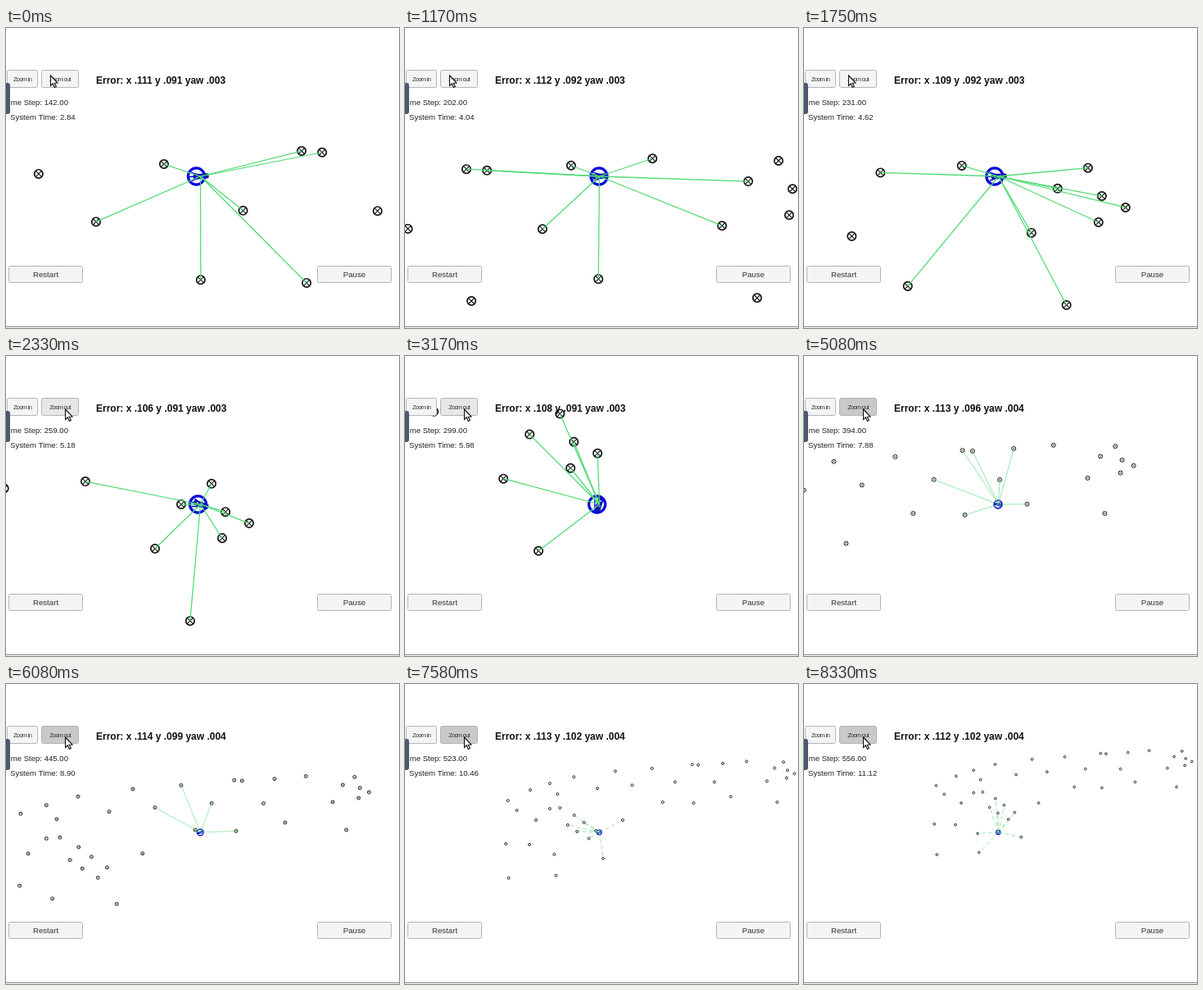
Write an HTML page with a canvas that moves like this. It is 480 px wide and 366 px high and loops after 8.51 s.

```html
<!DOCTYPE html>
<html lang="en">
<head>
<meta charset="utf-8">
<title>Particle filter simulation</title>
<style>
  html, body { margin: 0; width: 100%; height: 100%; overflow: hidden; background: #fff; }
  canvas { display: block; }
</style>
</head>
<body>
<canvas id="stage" width="480" height="366"></canvas>
<script>
const ctx = document.getElementById('stage').getContext('2d');
const LOOP = 8510, TICK = 1000 / 12;
const SKIPPED = [51, 77, 88, 92, 101];   // ticks on which the picture holds
const CENTER = { x: 237.5, y: 181 };
const RANGE = 53.97;                     // sensor range in world units
const ZOOM_START = 3190;
const FONT = '"Liberation Sans", Arial, sans-serif';

// Landmarks in world units
const landmarks = [
  [125, 142], [136, 154], [152.5, 129], [176.5, 121], [186, 134], [206, 113],
  [176.5, 152], [189, 151], [159.5, 166], [235, 127], [257, 106], [277.6, 123.2],
  [302, 102.5], [330.4, 119.2], [351.4, 97.8], [358.8, 98.3], [389, 96.5], [418.2, 94],
  [315.2, 144], [353.2, 145.1], [378.7, 119.3], [398.8, 137.2], [452.6, 102.2], [463.5, 94.8],
  [468.5, 104.9], [467.3, 114.3], [477, 109], [443.2, 118.1], [455.8, 144], [206.5, 160],
  [198.5, 172], [218.5, 169], [210, 180], [224.5, 188.5], [233, 179], [266, 166],
  [242, 213], [122.5, 195], [151.5, 196], [182, 208], [126, 237], [184, 234]
];

// Time, x, y along the drive
const route = [
  [0, 315.1, 106.9], [1167, 399.2, 100.4], [1920, 440, 97.8], [2333, 459.5, 102.2],
  [2833, 477, 112], [3250, 476, 131], [3667, 456, 145.4], [4083, 437.9, 149.4],
  [5167, 372.8, 136.8], [5650, 345.5, 141], [6083, 320, 146.3],
  [7583, 237.5, 181], [8333, 210.7, 206.4]
];

// Time, step, x error, y error (thousandths)
const readings = [
  [0, 142, 111, 91], [1167, 202, 112, 92], [2333, 259, 106, 91], [4083, 342, 111, 92],
  [6083, 445, 114, 99], [7583, 523, 113, 102], [8333, 556, 112, 102]
];

const clamp = v => Math.max(0, Math.min(1, v));

function segment(keys, t) {
  let i = 0;
  while (i < keys.length - 2 && t >= keys[i + 1][0]) i++;
  return i;
}

function reading(t, col) {
  const i = segment(readings, t), a = readings[i], b = readings[i + 1];
  return Math.round(a[col] + (b[col] - a[col]) * clamp((t - a[0]) / (b[0] - a[0])));
}

function slope(i, col) {
  const a = route[Math.max(0, i - 1)], b = route[Math.min(route.length - 1, i + 1)];
  return (b[col] - a[col]) / (b[0] - a[0]);
}

// Cubic Hermite through the route points
function along(t, col) {
  const i = segment(route, t), a = route[i], b = route[i + 1];
  const d = b[0] - a[0], u = clamp((t - a[0]) / d), v = 1 - u;
  return a[col] * (1 + 2 * u) * v * v + slope(i, col) * d * u * v * v
       + b[col] * u * u * (3 - 2 * u) - slope(i + 1, col) * d * u * u * v;
}

const carAt = t => ({ x: along(t, 1), y: along(t, 2) });

// The camera pulls back at constant speed while the button is held
const scaleAt = t => 1 / (0.294 + 0.162 * Math.max(0, t - ZOOM_START) / 1000);

function line(x1, y1, x2, y2) {
  ctx.beginPath();
  ctx.moveTo(x1, y1);
  ctx.lineTo(x2, y2);
  ctx.stroke();
}

function ring(x, y, r) {
  ctx.beginPath();
  ctx.arc(x, y, r, 0, Math.PI * 2);
}

function drawLandmark(x, y, s) {
  const r = Math.max(1.3, 1.52 * s), k = r * 0.62;
  ring(x, y, r);
  ctx.fillStyle = '#fff';
  ctx.fill();
  ctx.strokeStyle = '#111';
  ctx.lineWidth = Math.max(0.9, 0.5 * s);
  ctx.stroke();
  if (s > 1.15) {
    ctx.lineWidth = 0.32 * s;
    line(x - k, y - k, x + k, y + k);
    line(x - k, y + k, x + k, y - k);
  }
}

function drawBeam(x, y, s) {
  ctx.strokeStyle = '#4fdb74';
  ctx.lineWidth = Math.max(0.55, 0.37 * s);
  ctx.setLineDash(s < 1.15 ? [5, 3] : []);
  line(CENTER.x, CENTER.y, x, y);
  ctx.setLineDash([]);
}

function drawCar(t, n, s) {
  const a = carAt(t - 40), b = carAt(t + 40);
  const off = -0.74 * s * (1 + Math.cos(0.624 * n));
  const r = Math.max(2.3, 2.95 * s), x = CENTER.x + off * (s > 3 ? 1 : 0.2), y = CENTER.y;
  const heading = Math.atan2(b.y - a.y, b.x - a.x);

  ctx.save();
  ctx.translate(CENTER.x, CENTER.y);
  ctx.rotate(heading);
  ctx.fillStyle = '#12208c';
  ctx.beginPath();
  ctx.roundRect(-2.6 * s, -0.95 * s, 5.6 * s, 1.9 * s, 0.6 * s);
  ctx.fill();
  ctx.fillStyle = '#b9c3ee';
  ctx.fillRect(-1.5 * s, -0.55 * s, 0.6 * s, 1.1 * s);
  ctx.fillRect(0.3 * s, -0.55 * s, 0.6 * s, 1.1 * s);
  ctx.restore();

  ctx.strokeStyle = '#0505dc';
  ctx.lineWidth = Math.max(1.1, 0.95 * s);
  ring(x, y, r);
  ctx.stroke();
  ctx.lineWidth = 0.45 * s;
  const dx = Math.cos(heading) * r, dy = Math.sin(heading) * r;
  line(x - dx, y - dy, x + dx, y + dy);
  line(x - dx * 0.6 - dy * 0.5, y - dy * 0.6 + dx * 0.5, x + dx * 0.8, y + dy * 0.8);
  line(x - dx * 0.6 + dy * 0.5, y - dy * 0.6 - dx * 0.5, x + dx * 0.8, y + dy * 0.8);
}

function text(str, x, y, font, color = '#222', align = 'left', spacing = 0) {
  ctx.font = font + ' ' + FONT;
  ctx.fillStyle = color;
  ctx.textAlign = align;
  ctx.letterSpacing = spacing + 'px';
  ctx.fillText(str, x, y);
}

function button(label, x, y, w, h, size, fill = '#f4f4f4', spacing = 0) {
  ctx.beginPath();
  ctx.roundRect(x + 0.5, y + 0.5, w - 1, h - 1, 2);
  ctx.fillStyle = fill;
  ctx.fill();
  ctx.strokeStyle = '#b4b4b4';
  ctx.lineWidth = 1;
  ctx.stroke();
  text(label, x + w / 2, y + h / 2 + size * 0.36, size + 'px', '#333', 'center', spacing);
}

function drawCursor(x, y) {
  ctx.save();
  ctx.translate(x, y);
  ctx.beginPath();
  ctx.moveTo(0.5, 0);
  ctx.lineTo(0.5, 12.5);
  ctx.lineTo(3.3, 9.8);
  ctx.lineTo(5.3, 14.4);
  ctx.lineTo(7.3, 13.5);
  ctx.lineTo(5.3, 9.2);
  ctx.lineTo(9, 9);
  ctx.closePath();
  ctx.fillStyle = '#fff';
  ctx.strokeStyle = '#111';
  ctx.lineWidth = 1.1;
  ctx.fill();
  ctx.stroke();
  ctx.restore();
}

function drawPanel(t) {
  const step = reading(t, 1);
  const milli = v => '.' + String(v).padStart(3, '0');
  const move = clamp((t - 1950) / 280), ease = move * move * (3 - 2 * move);
  const fill = t >= ZOOM_START ? '#c9c9c9' : move > 0.5 ? '#e7e7e7' : '#f4f4f4';

  button('Zoom in', 1, 51, 38, 22, 7.5, '#f4f4f4', -0.7);
  button('Zoom out', 43, 51, 46, 22, 7.5, fill, -0.75);
  button('Restart', 3, 290, 91, 21, 9.7);
  button('Pause', 380, 290, 91, 21, 9.7);

  text(`Error: x ${milli(reading(t, 2))} y ${milli(reading(t, 3))} yaw ${milli(t < 3200 ? 3 : 4)}`,
    110, 68, 'bold 12px', '#111');
  text('Time Step: ' + step.toFixed(2), -2, 94, '9.6px');
  text('System Time: ' + (step / 50).toFixed(2), 5, 112, '9.6px');

  ctx.fillStyle = '#4b5a70';
  ctx.beginPath();
  ctx.roundRect(-4, 67, 9, 38, 3);
  ctx.fill();
  ctx.fillStyle = '#858585';
  ctx.fillRect(0, 364, 480, 1);
  drawCursor(54 + 18 * ease, 58 + 7 * ease);
}

function draw(n) {
  const t = n * TICK, s = scaleAt(t), car = carAt(t);
  ctx.fillStyle = '#fff';
  ctx.fillRect(0, 0, 480, 366);

  const points = landmarks.map(([x, y]) => ({
    x: CENTER.x + s * (x - car.x),
    y: CENTER.y + s * (y - car.y),
    seen: Math.hypot(x - car.x, y - car.y) < RANGE
  }));
  points.forEach(p => drawLandmark(p.x, p.y, s));
  drawCar(t, n, s);
  points.filter(p => p.seen).forEach(p => drawBeam(p.x, p.y, s));
  drawPanel(t);
}

function tickAt(ms) {
  let n = Math.floor((ms + 4) / TICK);
  n = Math.min(n, 100);
  return SKIPPED.includes(n) ? n - 1 : n;
}

const start = performance.now();
function frame() {
  draw(tickAt((performance.now() - start) % LOOP));
  requestAnimationFrame(frame);
}
frame();
</script>
</body>
</html>
```
